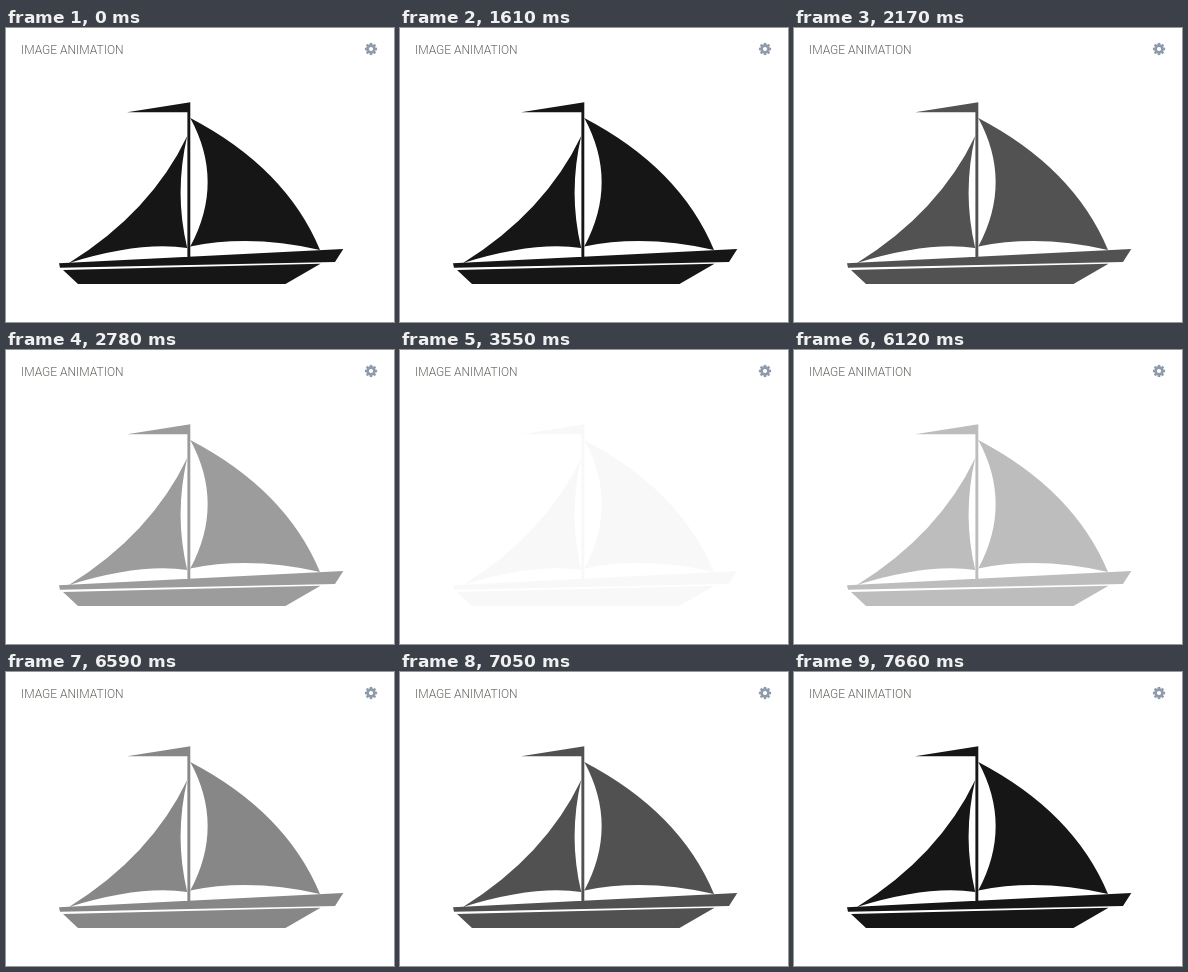
An HTML page with a canvas for the animation above (7730 ms loop, 388 px wide and 294 px high).

```html
<!DOCTYPE html>
<html lang="en">
<head>
<meta charset="utf-8">
<title>Image animation</title>
<style>
  html, body { margin: 0; width: 100%; height: 100%; overflow: hidden; background: #fff; }
  canvas { position: absolute; left: 0; top: 0; width: 388px; height: 294px; }
  h1 {
    position: absolute; left: 15px; top: 14px; margin: 0;
    font: 300 12px/16px Roboto, sans-serif; color: #66645e; white-space: nowrap;
  }
</style>
</head>
<body>
<canvas id="stage"></canvas>
<h1>IMAGE ANIMATION</h1>
<script>
const W = 388, H = 294, LOOP = 7730;
const INK = "#161616", GEAR = "#8f9baa";

// Both fades are linear and advance in discrete steps.
const STEP = 153.6, STEPS = 12;
const FADE_OUT = { start: 1703, from: 0.981, change: -0.0796 };
const FADE_IN = { start: 5810, from: 0.13, change: 0.077 };

const canvas = document.getElementById("stage");
const ctx = canvas.getContext("2d");
const ratio = window.devicePixelRatio || 1;
canvas.width = W * ratio;
canvas.height = H * ratio;

const boat = new Path2D();

function polygon(...points) {
  points.forEach(([x, y], i) => i ? boat.lineTo(x, y) : boat.moveTo(x, y));
  boat.closePath();
}

// Each side is [controlX, controlY, endX, endY].
function sail(x, y, ...sides) {
  boat.moveTo(x, y);
  sides.forEach(side => boat.quadraticCurveTo(...side));
  boat.closePath();
}

polygon([121, 84.3], [184.3, 74.2], [184.3, 230], [181.4, 230], [181.4, 84.3]);
sail(181.2, 108, [145, 184, 63, 235], [134, 213, 181.2, 220], [168, 165, 181.2, 108]);
sail(184.3, 90, [280, 140, 314, 222], [245, 206, 184.3, 218.5], [219, 154, 184.3, 90]);
polygon([53, 235.3], [337.3, 221], [329, 234], [54, 239.8]);
polygon([57, 241.9], [314.5, 235.8], [279.5, 256], [72, 256]);

function opacityAt(time) {
  const fade = time < FADE_IN.start ? FADE_OUT : FADE_IN;
  const step = Math.min(STEPS, Math.floor((time - fade.start) / STEP));
  return Math.min(1, fade.from + fade.change * step);
}

function disc(radius, colour) {
  ctx.fillStyle = colour;
  ctx.beginPath();
  ctx.arc(0, 0, radius, 0, Math.PI * 2);
  ctx.fill();
}

function drawGear(x, y) {
  ctx.save();
  ctx.translate(x, y);
  ctx.fillStyle = GEAR;
  for (let i = 0; i < 4; i++) {
    ctx.fillRect(-1.3, -6.1, 2.6, 12.2);
    ctx.rotate(Math.PI / 4);
  }
  disc(4.7, GEAR);
  disc(2.1, "#fff");
  ctx.restore();
}

function draw(time) {
  ctx.setTransform(ratio, 0, 0, ratio, 0, 0);
  ctx.clearRect(0, 0, W, H);
  drawGear(365, 21);
  ctx.globalAlpha = opacityAt(time);
  ctx.fillStyle = INK;
  ctx.fill(boat);
  ctx.globalAlpha = 1;
}

const start = performance.now();

function frame() {
  draw((performance.now() - start) % LOOP);
  requestAnimationFrame(frame);
}
frame();
</script>
</body>
</html>
```
